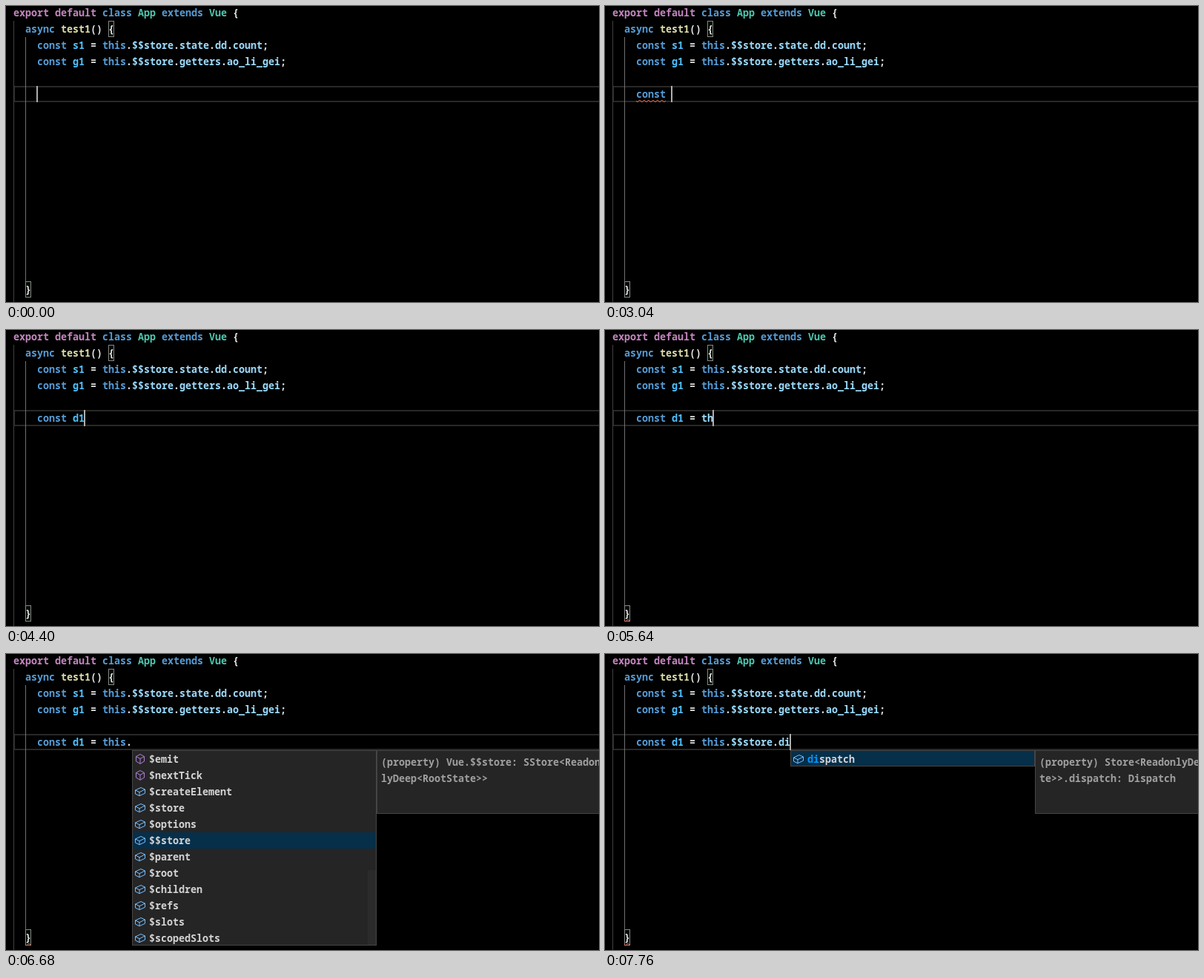
Write an HTML page with a canvas that moves like this. It is 800 px wide and 400 px high and loops after 8000 ms.

```html
<!DOCTYPE html>
<html lang="en">
<head>
<meta charset="utf-8">
<title>Typing in a code editor</title>
<style>
  html, body { margin: 0; width: 100%; height: 100%; overflow: hidden; background: #000; }
  canvas { display: block; }
</style>
</head>
<body>
<canvas id="stage" width="800" height="400"></canvas>
<script>
const ctx = document.getElementById('stage').getContext('2d');
const LOOP = 8000, CELL = 8, LINE = 22;
const FONT = 'bold 13.3333px "Noto Sans Mono", "DejaVu Sans Mono", monospace';

const color = {
  control: '#c586c0', keyword: '#569cd6', type: '#4ec9b0', func: '#dcdcaa',
  prop: '#9cdcfe', constant: '#4fc1ff', plain: '#e4e4e4',
  panel: '#252526', border: '#454545', selected: '#062f4a', match: '#0097fb',
  label: '#d4d4d4', dim: '#a0a0a0', error: '#f0725c',
  method: '#b180d7', field: '#75beff'
};

// Each line: column, row, then [style, text] pairs.
const code = [
  [0, 0, ['control', 'export default '], ['keyword', 'class '], ['type', 'App '],
    ['keyword', 'extends '], ['type', 'Vue '], ['plain', '{']],
  [2, 1, ['keyword', 'async '], ['func', 'test1'], ['plain', '() {']],
  [4, 2, ['keyword', 'const '], ['constant', 's1 '], ['plain', '= '], ['keyword', 'this'],
    ['plain', '.'], ['prop', '$$store'], ['plain', '.'], ['prop', 'state'],
    ['plain', '.'], ['prop', 'dd'], ['plain', '.'], ['prop', 'count'], ['plain', ';']],
  [4, 3, ['keyword', 'const '], ['constant', 'g1 '], ['plain', '= '], ['keyword', 'this'],
    ['plain', '.'], ['prop', '$$store'], ['plain', '.'], ['prop', 'getters'],
    ['plain', '.'], ['prop', 'ao_li_gei'], ['plain', ';']],
  [2, 17, ['plain', '}']]
];

const popups = {
  snippet: {
    x: 98, items: ['dowhile'], selected: 0, matched: 1, icon: () => 'snippet',
    hint: 'Do-While Statem…', height: 136, close: true,
    lines: [[146, 'Do-While Statement (TypeScript Langua'], [168, 'ge Basics)'],
      [206, 'do {', 'label'], [250, '} while (condition);', 'label']]
  },
  members: {
    x: 170, selected: 5, matched: 0, height: 86, scroll: true,
    items: ['$emit', '$nextTick', '$createElement', '$store', '$options', '$$store',
      '$parent', '$root', '$children', '$refs', '$slots', '$scopedSlots'],
    icon: i => i < 2 ? 'method' : 'field',
    lines: [[146, '(property) Vue.$$store: SStore<Readon'], [168, 'lyDeep<RootState>>']]
  },
  dispatch: {
    x: 250, items: ['dispatch'], selected: 0, matched: 2, icon: () => 'field', height: 86,
    lines: [[146, '(property) Store<ReadonlyDeep<RootSta'], [168, 'te>>.dispatch: Dispatch']]
  }
};

// Changes are merged in order of time; squiggles are [x, width, y].
const constError = [42, 40, 127], nameError = [90, 16, 127], braceError = [26, 8, 391];
const steps = [
  [0, { typed: '', caret: true, squiggle: null, popup: null }],
  [1360, { caret: false }],
  [1800, { caret: true }],
  [2120, { typed: 'c' }],
  [3040, { typed: 'const ', squiggle: constError }],
  [3520, { caret: false }],
  [4000, { typed: 'const d', caret: true }],
  [4120, { popup: 'snippet' }],
  [4360, { typed: 'const d1', popup: null }],
  [4400, { squiggle: null }],
  [4600, { typed: 'const d1 ' }],
  [4720, { squiggle: nameError }],
  [5000, { typed: 'const d1 =' }],
  [5160, { typed: 'const d1 = ' }],
  [5320, { squiggle: braceError }],
  [5560, { typed: 'const d1 = t' }],
  [5640, { typed: 'const d1 = th' }],
  [6200, { typed: 'const d1 = this.', popup: 'members' }],
  [6680, { caret: false }],
  [7080, { typed: 'const d1 = this.$$store', caret: true, popup: null }],
  [7320, { typed: 'const d1 = this.$$store.' }],
  [7640, { typed: 'const d1 = this.$$store.di' }],
  [7760, { popup: 'dispatch' }]
];

function rect(x, y, w, h, fill) {
  ctx.fillStyle = fill;
  ctx.fillRect(x, y, w, h);
}

function frame(x, y, w, h, stroke, width = 1) {
  ctx.strokeStyle = stroke;
  ctx.lineWidth = width;
  ctx.strokeRect(x + width / 2, y + width / 2, w - width, h - width);
}

function text(str, x, baseline, fill) {
  ctx.fillStyle = fill;
  ctx.fillText(str, x, baseline);
}

function path(points, stroke, closed = false) {
  ctx.beginPath();
  points.forEach(([x, y]) => ctx.lineTo(x, y));
  if (closed) ctx.closePath();
  ctx.strokeStyle = stroke;
  ctx.lineWidth = 1;
  ctx.stroke();
}

function codeLine(column, row, spans) {
  let x = 10 + column * CELL;
  for (const [style, str] of spans) {
    text(str, x, row * LINE + 14, color[style]);
    x += str.length * CELL;
  }
}

function highlight(str) {
  const words = str.match(/\w+|\$+\w*|\s+|[^\w\s$]/g) || [];
  return words.map(word => {
    if (word === 'const' || word === 'this') return ['keyword', word];
    if (/^d1?$/.test(word)) return ['constant', word];
    return [/[\w$]/.test(word) ? 'prop' : 'plain', word];
  });
}

function squiggle([x, width, y]) {
  ctx.save();
  ctx.beginPath();
  ctx.rect(x, y, width, 3);
  ctx.clip();
  const points = [];
  for (let i = -1; i * 3 < width + 6; i++) points.push([x + 1.75 + i * 3, y + (i % 2 ? 0 : 3)]);
  path(points, color.error);
  ctx.restore();
}

function icon(kind, x, y) {
  ctx.save();
  ctx.translate(x, y);
  if (kind === 'snippet') {
    path([[2.5, 13], [2.5, 2.5], [14.5, 2.5], [14.5, 13]], color.label);
    for (let i = 2; i < 15; i += 2) rect(i, 14, 1, 1, color.label);
  } else if (kind === 'method') {
    path([[8, 1.5], [13.5, 4.5], [13.5, 11], [8, 14.3], [2.5, 11], [2.5, 4.5]], color.method, true);
    path([[2.5, 4.5], [8, 7.5], [13.5, 4.5]], color.method);
    path([[8, 7.5], [8, 14.3]], color.method);
  } else {
    path([[9, 2.5], [14.5, 5], [14.5, 10.2], [7, 13.7], [1.5, 11], [1.5, 6]], color.field, true);
    path([[1.5, 6], [7, 8.7], [14.5, 5]], color.field);
    path([[7, 8.7], [7, 13.7]], color.field);
  }
  ctx.restore();
}

function panel(x, y, w, h) {
  rect(x, y, w, h, color.panel);
  frame(x, y, w, h, color.border);
}

function drawPopup(p) {
  const top = 130, width = 330, listHeight = p.items.length * LINE;
  const side = p.x + width;
  panel(p.x, top, width, listHeight);
  if (p.scroll) rect(side - 12, 292, 11, 101, '#2b2b2c');
  p.items.forEach((item, i) => {
    const y = top + 1 + i * LINE, x = p.x + 23;
    const chosen = i === p.selected, matched = chosen ? p.matched : 0;
    if (chosen) rect(p.x + 1, y, width - 2, Math.min(LINE, listHeight - i * LINE - 2), color.selected);
    icon(p.icon(i), p.x + 3, y + 3);
    text(item.slice(0, matched), x, y + 16, color.match);
    text(item.slice(matched), x + matched * CELL, y + 16, color.label);
  });
  if (p.hint) text(p.hint, p.x + 189, 147, '#9aa7b0');

  panel(side, top, width, p.height);
  for (const [y, str, style = 'dim'] of p.lines) text(str, side + 6, y + 5, color[style]);
  if (p.close) {
    path([[side + 312, 136.5], [side + 320, 144.5]], color.label);
    path([[side + 320, 136.5], [side + 312, 144.5]], color.label);
  }
}

function draw(time) {
  const state = Object.assign({}, ...steps.filter(([at]) => at <= time).map(([, change]) => change));
  rect(0, 0, 800, 400, '#000');
  ctx.font = FONT;
  ctx.textBaseline = 'alphabetic';

  frame(10, 108, 800, 22, '#282828', 2);
  rect(10, 20, 1, 380, '#404040');
  rect(26, 42, 1, 330, '#707070');
  for (const [x, y] of [[138, 20], [26, 372]]) {
    rect(x, y, 8, LINE, 'rgba(0, 100, 0, 0.1)');
    frame(x, y, 8, LINE, '#888');
  }

  for (const [column, row, ...spans] of code) codeLine(column, row, spans);
  codeLine(4, 5, highlight(state.typed));
  if (state.squiggle) squiggle(state.squiggle);
  if (state.caret) rect(41 + state.typed.length * CELL, 108, 2, LINE, '#aeafad');
  if (state.popup) drawPopup(popups[state.popup]);
}

const start = performance.now();
function tick() {
  draw((performance.now() - start) % LOOP);
  requestAnimationFrame(tick);
}
tick();
</script>
</body>
</html>
```
